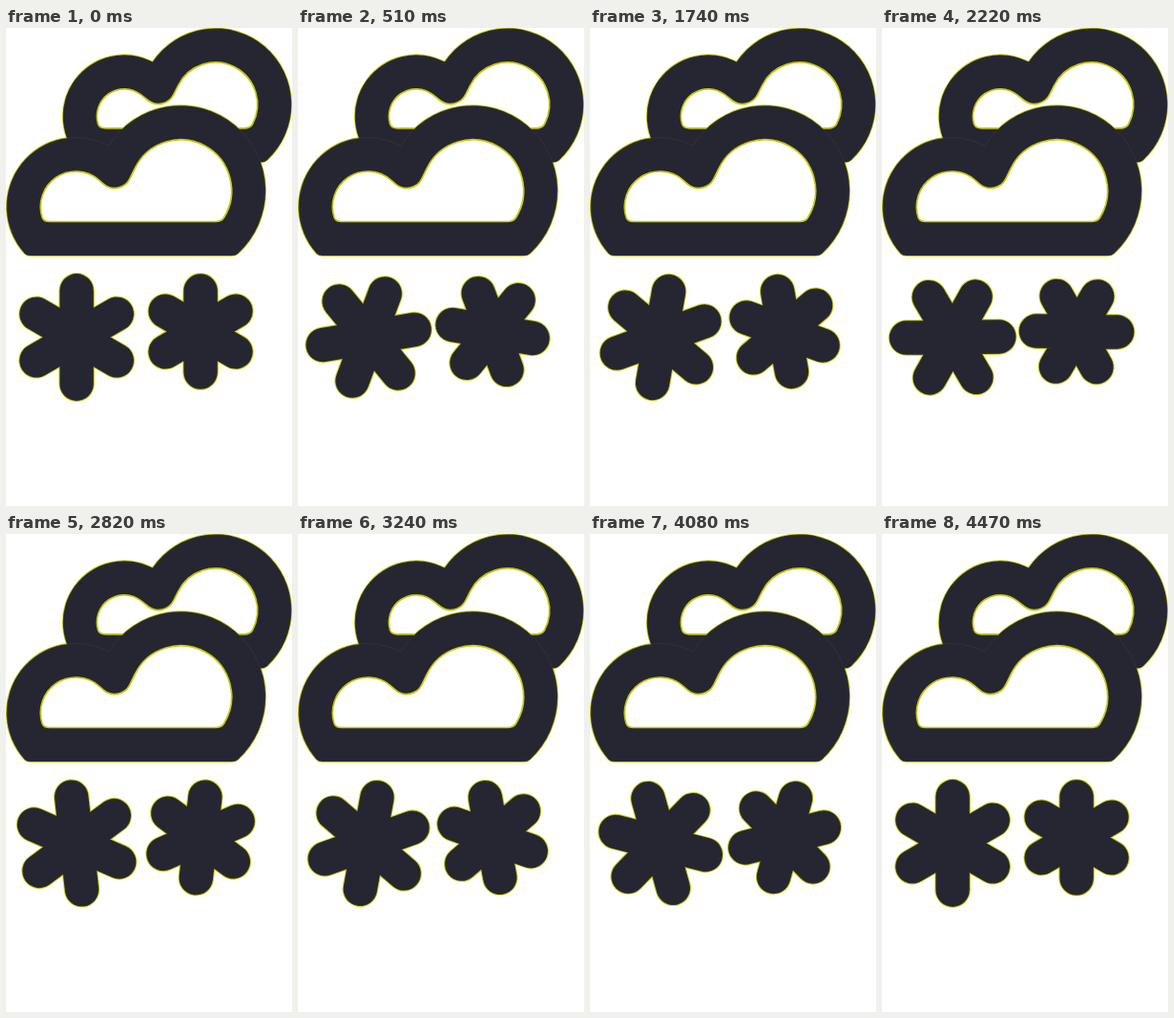
Write an HTML page that moves like this. It is 300 px wide and 500 px high and loops after 4500 ms.

```html
<!DOCTYPE html>
<html lang="en">
<head>
<meta charset="utf-8">
<title>Snow clouds</title>
<style>
  html, body { margin: 0; width: 100%; height: 100%; overflow: hidden; background: #fff; }
  svg { display: block; width: 300px; height: 500px; }
  .rim { fill: none; stroke: #c6ca08; stroke-width: 1.7; }
  .ink { fill: #262633; }
  .hole { fill: #fff; }
  .seam { fill: none; stroke: #77762a; stroke-width: .6; opacity: .25; }
  .arms { stroke-linecap: round; fill: none; }
</style>
</head>
<body>
<svg viewBox="0 0 300 500"><g id="sky"></g><g id="flakes"></g></svg>
<script>
  const LOOP = 4500, STEP = 30, LAST = LOOP / STEP - 1;
  const NS = "http://www.w3.org/2000/svg";
  const HALF = 17.8;
  const sky = document.getElementById("sky");
  const root = document.getElementById("flakes");

  function make(tag, attrs, parent) {
    const el = document.createElementNS(NS, tag);
    for (const key in attrs) el.setAttribute(key, attrs[key]);
    return parent.appendChild(el);
  }

  const circle = (x, y, r) => ({ x, y, r });
  const resize = (c, by) => circle(c.x, c.y, c.r + by);
  const gap = (a, b) => Math.hypot(b.x - a.x, b.y - a.y);
  const bearing = (a, b) => Math.atan2(b.y - a.y, b.x - a.x);
  const at = (c, t) => `${c.x + c.r * Math.cos(t)} ${c.y + c.r * Math.sin(t)}`;

  // Line to the start of an arc, then along it; dir 1 is clockwise.
  function arc(c, from, to, dir = 1) {
    const turn = 2 * Math.PI;
    const span = ((dir * (to - from)) % turn + turn) % turn;
    return `L${at(c, from)}A${c.r} ${c.r} 0 ${span > Math.PI ? 1 : 0} ${dir > 0 ? 1 : 0} ${at(c, to)}`;
  }

  // Wraps the upper contour with a flat base and two rounded corners.
  function onBase(left, right, base, lift, run, top) {
    const rise = c => Math.asin((base - lift - c.y) / c.r);
    const reach = c => Math.sqrt(c.r ** 2 - (base - c.y) ** 2);
    const x0 = left.x - reach(left), x1 = right.x + reach(right);
    const a = Math.PI - rise(left), b = rise(right);
    return `M${x0 + run} ${base}Q${x0} ${base} ${at(left, a)}` + top(a, b) +
      `Q${x1} ${base} ${x1 - run} ${base}Z`;
  }

  function outline(left, right, base) {
    const d = gap(left, right), dir = bearing(left, right);
    const lean = (r, s) => Math.acos((r * r + d * d - s * s) / (2 * d * r));
    const end = dir - lean(left.r, right.r);
    const start = dir + Math.PI + lean(right.r, left.r);
    return onBase(left, right, base, 2.2, 4, (a, b) => arc(left, a, end) + arc(right, start, b));
  }

  // The knob hangs between both inner circles, joined by tangents.
  function opening(left, right, knob, base) {
    const slack = c => Math.acos(Math.min(1, (c.r + knob.r) / gap(c, knob)));
    const p = bearing(left, knob) - slack(left);
    const q = bearing(knob, right) + slack(right);
    return onBase(left, right, base, 4, 6, (a, b) =>
      arc(left, a, p) + arc(knob, p + Math.PI, q, -1) + arc(right, q + Math.PI, b));
  }

  const cloud = (left, right, knob, base) => ({
    out: outline(resize(left, HALF), resize(right, HALF), base + HALF),
    hole: opening(resize(left, -HALF), resize(right, -HALF), knob, base - HALF)
  });

  const back = cloud(circle(124, 92.4, 46.4), circle(219.8, 79.9, 61.7), circle(160, 61.8, 17.7), 122.6);
  const front = cloud(circle(73.3, 187, 54.8), circle(183.2, 170.2, 71.2), circle(114, 149.8, 17.7), 220.3);

  [
    [back.out, "rim"], [front.out, "rim"], [back.out, "ink"],
    [back.hole, "hole"], [back.hole, "rim"]
  ].forEach(([d, name]) => make("path", { d, class: name }, sky));

  // Front rim shows only where it crosses the white opening behind it.
  const clip = make("clipPath", { id: "gap" }, sky);
  make("path", { d: back.hole }, clip);
  make("path", { d: front.out, class: "rim", "clip-path": "url(#gap)" }, sky);

  [
    [front.out, "ink"], [front.out, "seam"], [front.hole, "hole"], [front.hole, "rim"]
  ].forEach(([d, name]) => make("path", { d, class: name }, sky));

  // Three crossing bars with round ends, over a slightly wider rim.
  function makeFlake(x, y, arm, dir) {
    const g = make("g", { class: "arms" }, root);
    const d = [0, 60, 120].map(a => {
      const r = a * Math.PI / 180;
      const dx = arm * Math.sin(r), dy = -arm * Math.cos(r);
      return `M${dx} ${dy}L${-dx} ${-dy}`;
    }).join("");
    make("path", { d, stroke: "#c6ca08", "stroke-width": 37.4 }, g);
    make("path", { d, stroke: "#262633", "stroke-width": 35.4 }, g);
    return { g, x, y, dir };
  }

  const flakes = [
    makeFlake(74.1, 323.5, 48.7, 1),
    makeFlake(204.1, 317.5, 42.6, -1)
  ];

  // Half a turn per loop; six-fold symmetry makes it seamless.
  function draw(ms) {
    const step = Math.floor((ms % LOOP) / STEP);
    const angle = 180 * step / LAST;
    for (const f of flakes)
      f.g.setAttribute("transform", `translate(${f.x} ${f.y}) rotate(${f.dir * angle})`);
  }

  const start = performance.now();
  function tick() {
    draw(performance.now() - start);
    requestAnimationFrame(tick);
  }
  tick();
</script>
</body>
</html>
```
